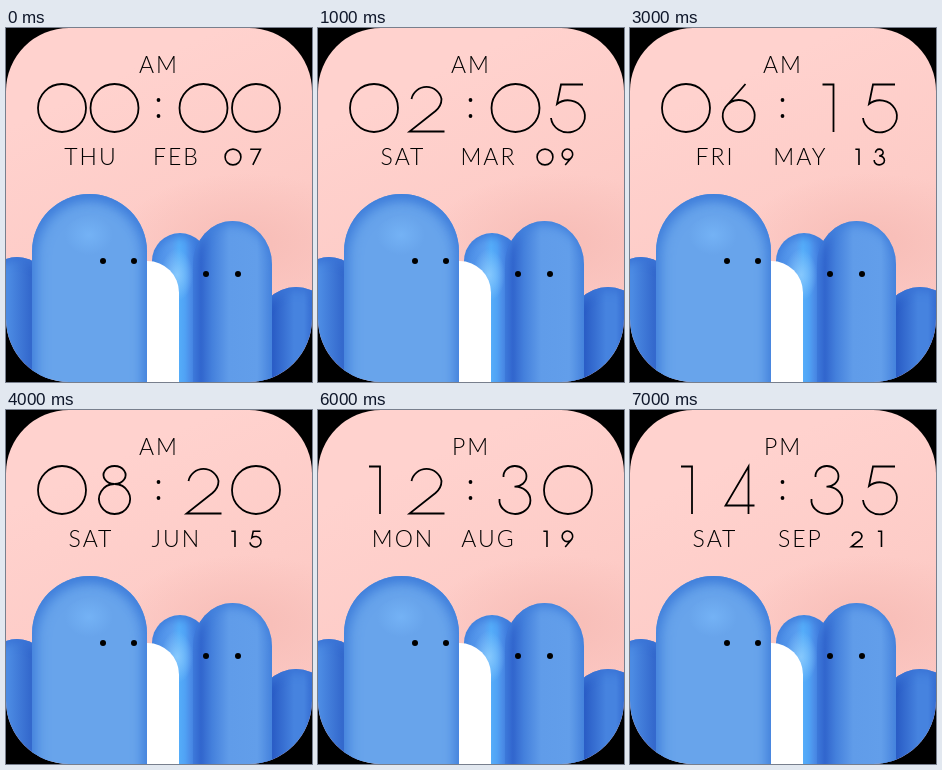
Animation of 306 by 354 pixels, one loop 8 s. Source, as an HTML page:

```html
<!DOCTYPE html>
<html lang="en">
<meta charset="utf-8">
<title>Watch face</title>
<style>
html, body { margin: 0; width: 100%; height: 100%; overflow: hidden; background: #000; }
#face {
  position: absolute; width: 306px; height: 354px; overflow: hidden; border-radius: 63px;
  background:
    radial-gradient(130px 70px at 240px 215px, #f8bfb9 20%, #f8bfb900),
    linear-gradient(155deg, #ffd2ce 20%, #fdcbc6 60%, #fac4bf);
}
.body { position: absolute; bottom: -60px; border-radius: 60px 60px 0 0; }
.far-left {
  left: -22px; top: 229px; width: 66px;
  background: linear-gradient(90deg, #4c8be3 24px, #3469cd 46px);
  box-shadow: inset 0 4px 8px #3a74d6;
}
.far-right {
  left: 252px; top: 259px; width: 76px;
  background: linear-gradient(90deg, #2a5dc6 15px, #4683df 36px, #4683df 46px, #3268cf 56px);
  box-shadow: inset 0 4px 8px #3a74d6;
}
.middle {
  left: 146px; top: 205px; width: 56px;
  background:
    radial-gradient(16px 26px at 25px 42px, #86c8fd, #86c8fd00),
    linear-gradient(90deg, #4a8ae4, #5a9eef 20px, #55adf9 27px, #50a2f5 33px, #4c8ee8 38px, #3873d9 46px);
  box-shadow: inset 0 4px 8px #3f7edc;
}
.right {
  left: 187px; top: 193px; width: 79px; border-radius: 40px 40px 0 0 / 44px 44px 0 0;
  background: linear-gradient(90deg, #3a72d8, #3165cd 8px, #4480dc 19px, #609ce9 36px, #629eea 64px, #4a86de);
  box-shadow: inset 0 4px 10px #4280dc;
}
.white { left: 110px; top: 233px; width: 63px; background: #fff; }
.big {
  left: 26px; top: 166px; width: 114.5px;
  background: radial-gradient(24px 20px at 57px 41px, #74b2f5, #68a4eb);
  box-shadow: inset 4px 4px 14px #3f7eda, inset -4px 4px 12px #4482dd;
}
svg { position: absolute; left: 0; top: 0; }
text { font: 300 23px Lato, sans-serif; letter-spacing: 2px; text-anchor: middle; }
path { fill: none; stroke: #000; stroke-width: 1.8px; vector-effect: non-scaling-stroke; }
#date path { stroke-width: 1.6px; }
</style>
<div id="face">
  <div class="body far-left"></div>
  <div class="body far-right"></div>
  <div class="body middle"></div>
  <div class="body right"></div>
  <div class="body white"></div>
  <div class="body big"></div>
  <svg width="306" height="354">
    <g id="eyes">
      <circle cx="97" cy="233" r="3"/><circle cx="128" cy="233" r="3"/>
      <circle cx="200" cy="246" r="3"/><circle cx="232" cy="246" r="3"/>
    </g>
    <circle cx="152.5" cy="72" r="1.9"/><circle cx="152.5" cy="88" r="1.9"/>
    <text id="half" x="153" y="44.5"></text>
    <text id="weekday" x="85" y="137.3"></text>
    <text id="month" x="170.4" y="137.3"></text>
    <g id="clock"></g>
    <g id="date"></g>
  </svg>
</div>
<script>
// Line-drawn numerals centred on the origin, 48 units tall
const numerals = [
  "M-24 0A24 24 0 1 1 24 0A24 24 0 1 1-24 0Z",
  "M-5-23.5H6V24",
  "M-15-9A15.3 15 0 0 1 15-9Q15-2 9 3L-17 23.5H18",
  "M-12-13A11.5 10.3 0 1 1-1-3.4A15.5 13.7 0 1 1-16 9",
  "M10 24V-23.5L-13 15.5H16",
  "M15-23.5H-7L-11-4A17 16 0 1 1-17 10",
  "M7-24L-13-1A16 16 0 1 0 0-8Q-8-8-13-1",
  "M-16-23.5H15L-8 24",
  "M0-6A11 9 0 1 1 .1-6A15.5 15 0 1 1 0-6Z",
  "M-7 24L13 1A16 16 0 1 0 0 8Q8 8 13 1",
];
const weekdays = ["THU", "SAT", "THU", "FRI", "SAT", "THU", "MON", "SAT"];
const months = ["FEB", "MAR", "APR", "MAY", "JUN", "JUL", "AUG", "SEP"];
const clockCells = [56, 108.5, 197.5, 250];
const dateCells = [227, 249.5];

const byId = id => document.getElementById(id);
const pad = n => String(n).padStart(2, "0");
const drawDigits = (id, string, cells, y, scale) => {
  byId(id).innerHTML = [...string].map((digit, i) =>
    `<path d="${numerals[digit]}" transform="translate(${cells[i]} ${y}) scale(${scale})"/>`).join("");
};

let shown = -1;
function tick() {
  const step = Math.floor(performance.now() / 1000) % 8;
  if (step !== shown) {
    shown = step;
    const hour = step * 2;
    byId("half").textContent = hour < 12 ? "AM" : "PM";
    byId("weekday").textContent = weekdays[step];
    byId("month").textContent = months[step];
    drawDigits("clock", pad(hour) + pad(step * 5), clockCells, 80, 1);
    drawDigits("date", pad(7 + step * 2), dateCells, 129, 0.33);
  }
  requestAnimationFrame(tick);
}
tick();
</script>
</html>
```
